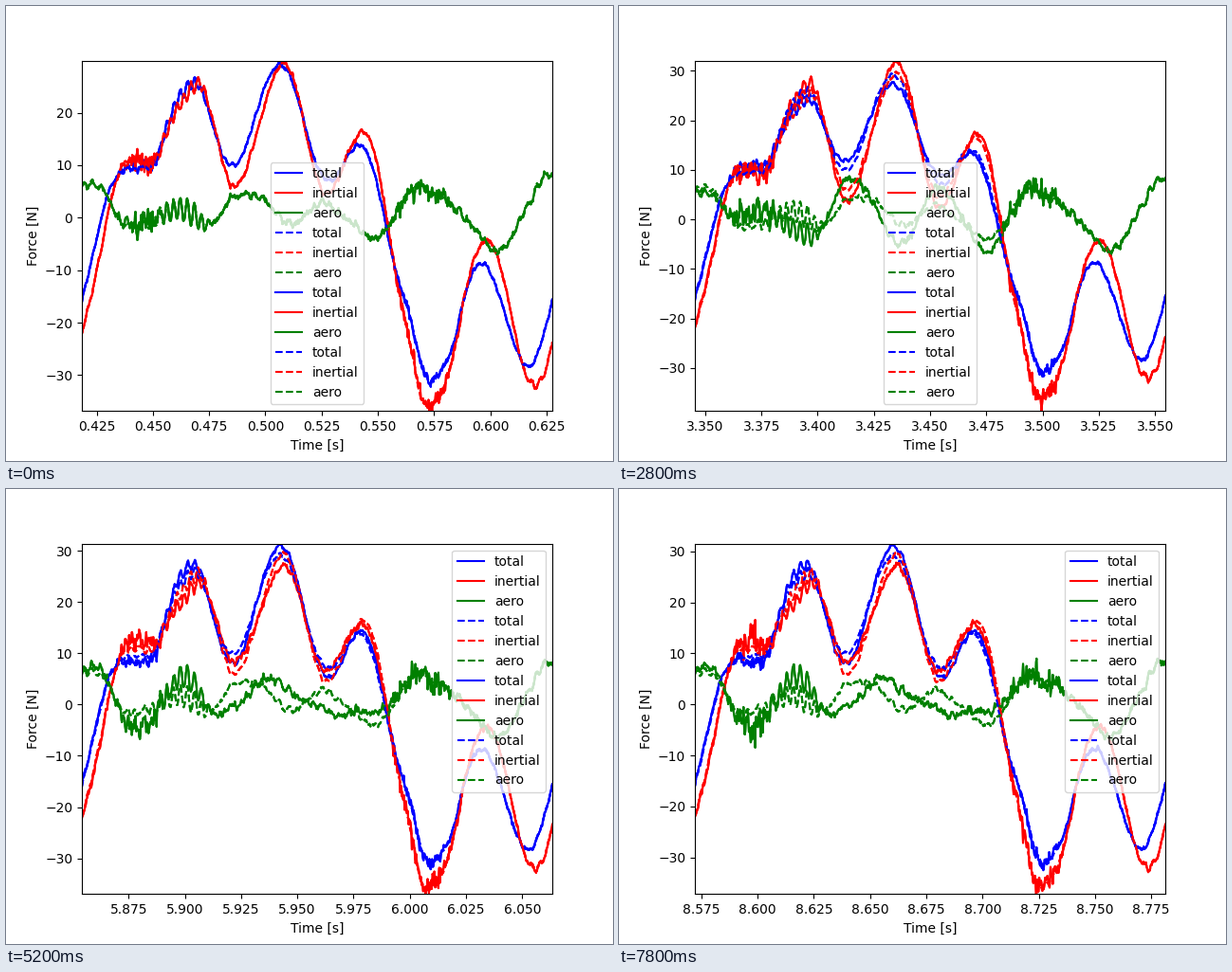
These frames come from a looping animation (640 by 480 pixels, 8 s). A matplotlib script:

```python
import numpy as np
import matplotlib.pyplot as plt
from matplotlib.animation import FuncAnimation

FRAMES, STEP = 40, 200
PERIOD, OFFSET = 0.20907, 0.0003   # seconds
WIDTH = 496                        # horizontal units of one stroke
x = np.linspace(0, WIDTH, 1046)

# Turning points of the mean stroke: position, force
TOTAL = [(-30, -29.3), (45, 9.3), (70, 9.4), (118, 25.7), (158, 10), (209, 29),
         (260, 7.2), (292, 13.6), (365, -31), (421, -8.7), (471, -28.3), (521, -3)]
INERTIAL = [(-12, -25), (50, 11), (72, 10.3), (122, 25.3), (161, 6.2), (213, 29.3),
            (258, 4.7), (297, 16.2), (362, -36.5), (427, -4.4), (478, -32.4), (520, -8)]


def ease_through(points):
    """Half-cosine easing from one turning point to the next."""
    px, py = np.array(points, float).T
    i = np.searchsorted(px, x, side="right") - 1
    t = (x - px[i]) / (px[i + 1] - px[i])
    return py[i] + (py[i + 1] - py[i]) * (1 - np.cos(np.pi * t)) / 2


def bump(center, width, power=2):
    return np.exp(-np.abs((x - center) / width) ** power)


def noise(rng, taps):
    """Unit noise, softened over a number of samples."""
    raw = rng.standard_normal(len(x) + taps - 1)
    return np.convolve(raw, np.ones(taps) / np.sqrt(taps), "valid")


def wave(length):
    return np.sin(2 * np.pi * x / length)


# Mean stroke: shared shoulders, opposite ripples
base = np.random.default_rng(5)
shoulder = 2 * bump(92, 12) + 5 * bump(346, 12) - 3.5 * bump(390, 13)
ripple = 1.3 * bump(105, 30, 4) * wave(7.3) + 0.25 * wave(9)
ref_total = ease_through(TOTAL) + shoulder + 0.6 * ripple + 0.25 * noise(base, 9)
ref_inertial = ease_through(INERTIAL) + shoulder - ripple + 0.3 * noise(base, 9)

# Stroke-to-stroke deviation and noise envelopes
swing = np.cos(2 * np.pi * (x - 60) / 101) * bump(178, 155, 4)
rough_total = 0.15 + 0.45 * bump(62, 26, 4) + 0.4 * bump(358, 30, 4)
rough_inertial = 0.2 + 0.9 * bump(62, 23, 4) + 0.8 * bump(358, 34, 4)


def stroke(n):
    """Total and inertial force of stroke n."""
    rng = np.random.default_rng(100 + n)
    sway = np.clip(2 * np.sin(2 * np.pi * n / 10), -1, 1)
    dev = 4.2 * sway * swing
    gain = 0.8 + 0.2 * abs(sway)
    total = ref_total + 0.45 * dev + gain * rough_total * noise(rng, 2)
    inertial = ref_inertial - 0.55 * dev + gain * rough_inertial * noise(rng, 2)
    return total, inertial


def forces(total, inertial):
    return [total, inertial, total - inertial]


fig, ax = plt.subplots(figsize=(6.4, 4.8), dpi=100)
ax.set_xlabel("Time [s]")
ax.set_ylabel("Force [N]")
lines = []
for style in ["-", "--"] * 2:
    for color, label in [("b", "total"), ("r", "inertial"), ("g", "aero")]:
        lines += ax.plot([], [], color + style, label=label)
legend = ax.legend(loc="lower center")


def update(n):
    start = OFFSET + PERIOD * (n + 2)
    time = start + PERIOD * x / WIDTH
    curves = forces(*stroke(n)) + forces(ref_total, ref_inertial)
    for line, force in zip(lines, curves * 2):
        line.set_data(time, force)
    ax.set_xlim(start, start + PERIOD)
    ax.set_ylim(np.min(curves), np.max(curves))
    upper = 4 <= n % 17 < 10
    legend.set_loc("upper right" if upper else "lower center")
    return lines


anim = FuncAnimation(fig, update, frames=FRAMES, interval=STEP,
                     repeat=True, repeat_delay=0, blit=False)
plt.show()
```
